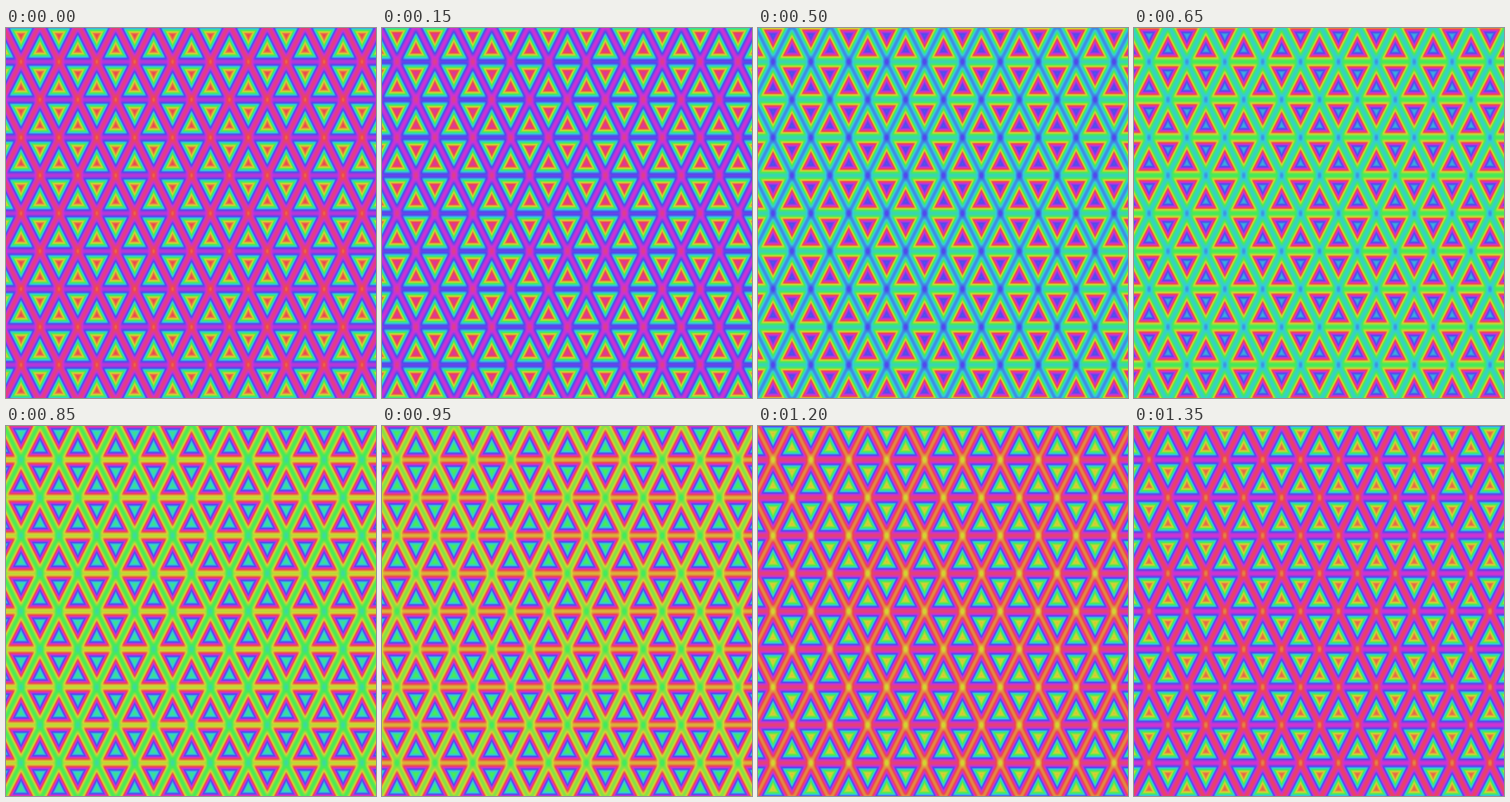
An HTML page with a canvas for the animation above (1.4 s loop, 500 by 500 pixels).

```html
<!DOCTYPE html>
<html lang="en">
<head>
<meta charset="utf-8">
<title>Triangle hue cycle</title>
<style>
  html, body { margin: 0; width: 100%; height: 100%; overflow: hidden; }
  canvas { display: block; width: 500px; height: 500px; }
</style>
</head>
<body>
<canvas id="stage" width="500" height="500"></canvas>
<script>
const SIZE = 500, STEP = 50, STEPS = 28, HUES = 1024;
const PITCH = 51.2, X0 = 20.3, Y0 = 45.6;
const INRADIUS = 1 / (1 + Math.sqrt(5));
const SHARPNESS = 8, EDGE_HUE = 290 / 360, DIAGONAL = 1.165;

const wheel = [
  [238, 68, 80], [214, 212, 48], [70, 235, 85],
  [50, 205, 218], [78, 72, 238], [205, 50, 212]
];

const ctx = document.getElementById('stage').getContext('2d');
const image = ctx.createImageData(SIZE, SIZE);
const pixels = new Uint32Array(image.data.buffer);

const toLine = v => Math.abs(v - Math.round(v));

// Smooth ridge: 1 on a line, levelling out to 0 at the triangle centre
function ridge(d) {
  const u = Math.max(0, 1 - d / INRADIUS);
  return (u * u * (3 - 2 * u)) ** SHARPNESS;
}

// Packed ABGR colours around the hue wheel
const palette = Uint32Array.from({ length: HUES }, (_, i) => {
  const pos = i / HUES * wheel.length, k = Math.floor(pos);
  const from = wheel[k], to = wheel[(k + 1) % wheel.length];
  const [r, g, b] = from.map((c, j) => Math.round(c + (to[j] - c) * (pos - k)));
  return (255 << 24 | b << 16 | g << 8 | r) >>> 0;
});

// Hue offset of every pixel, joining the ridges of the three sets of lines
const field = new Uint16Array(SIZE * SIZE);
const slant = 2 / Math.sqrt(5), weight = DIAGONAL ** SHARPNESS;
for (let y = 0; y < SIZE; y++) {
  const v = (y + 0.5 - Y0) / PITCH;
  const level = ridge(toLine(v));
  for (let x = 0; x < SIZE; x++) {
    const u = (x + 0.5 - X0) / PITCH;
    const sides = ridge(slant * toLine(u - v / 2)) + ridge(slant * toLine(u + v / 2));
    const rise = (level + weight * sides) ** (1 / SHARPNESS);
    field[y * SIZE + x] = Math.round(rise * EDGE_HUE * HUES);
  }
}

let shown = -1;
function draw(step) {
  const shift = HUES - Math.round(step / STEPS * HUES);
  for (let i = 0; i < pixels.length; i++) {
    pixels[i] = palette[(field[i] + shift) % HUES];
  }
  ctx.putImageData(image, 0, 0);
  shown = step;
}

const start = performance.now();
function tick() {
  const step = Math.floor((performance.now() - start) / STEP) % STEPS;
  if (step !== shown) draw(step);
  requestAnimationFrame(tick);
}
draw(0);
requestAnimationFrame(tick);
</script>
</body>
</html>
```
